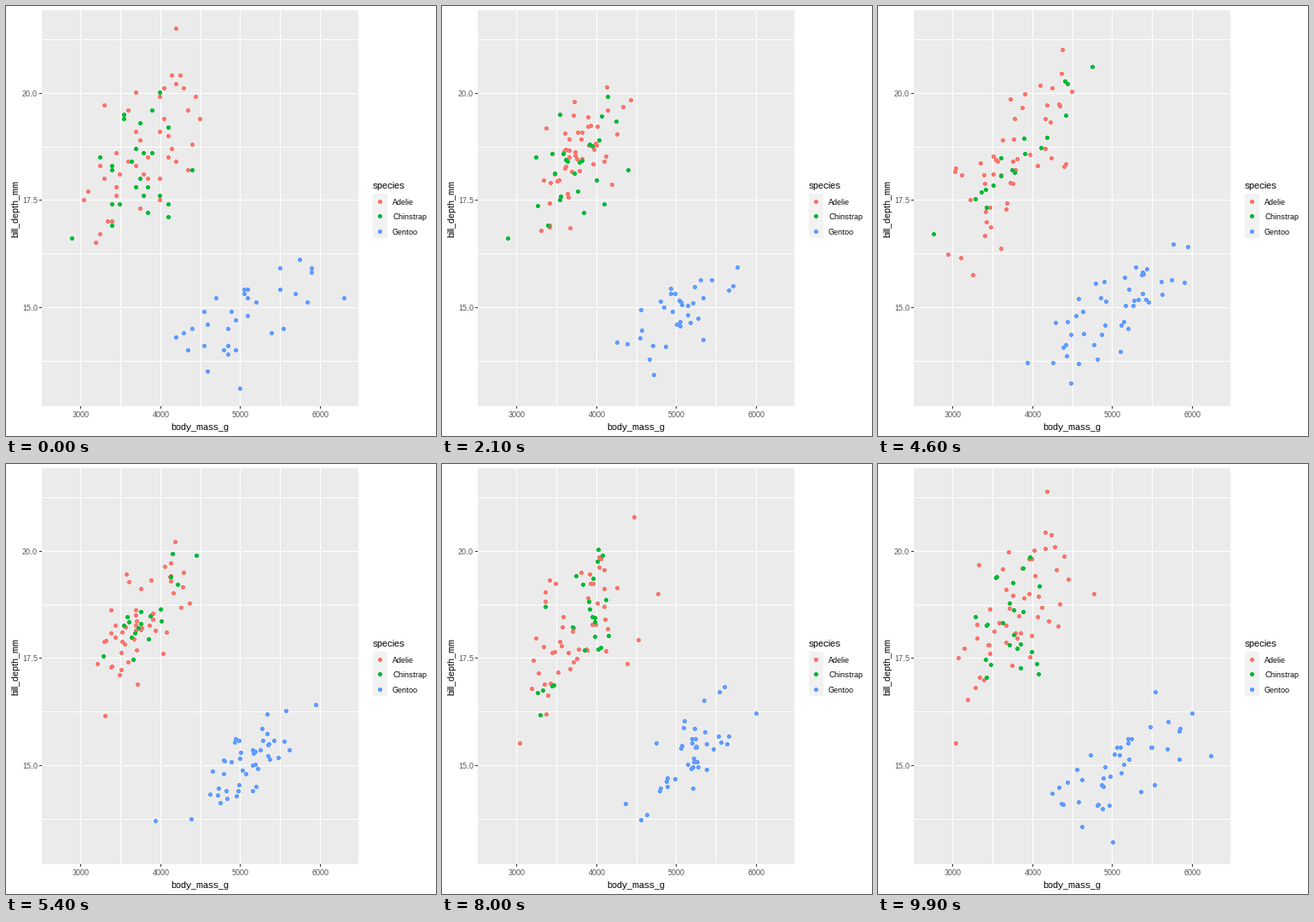
A matplotlib script that plays this animation: 504 px wide and 504 px high, repeating every 10 s.

```python
import numpy as np
import matplotlib.pyplot as plt
from matplotlib.animation import FuncAnimation
from matplotlib.collections import PolyCollection
from matplotlib.patches import Rectangle

SIZE = 504
LEFT, RIGHT, TOP, BOTTOM = 42, 413, 5, 469
MASS_MIN, MASS_MAX = 2520, 6480
DEPTH_MIN, DEPTH_MAX = 12.68, 21.92
COLORS = {"Adelie": "#F8766D", "Chinstrap": "#00BA38", "Gentoo": "#619CFF"}
DIAMOND = 2.5 * np.array([(1, 0), (0, 1), (-1, 0), (0, -1)])

# Per species, one row for each year: count, mass span, trend depth at
# both ends of the span, spread about the trend, two outlying points.
SHAPES = {
    "Adelie": (
        (47, (2900, 4700), (17.4, 20.1), 1.9, [(3250, 16.7), (4200, 21.5)]),
        (48, (2850, 4700), (16.7, 19.8), 1.9, [(2900, 16.1), (4400, 21.1)]),
        (50, (2900, 4700), (16.8, 19.6), 2.0, [(3050, 15.5), (4775, 19.0)]),
    ),
    "Chinstrap": (
        (24, (3200, 4200), (17.9, 19.0), 1.9, [(2900, 16.6), (4400, 18.2)]),
        (16, (3200, 4550), (16.9, 20.0), 1.1, [(2700, 16.6), (4800, 20.7)]),
        (22, (3200, 4300), (17.2, 19.4), 1.7, [(3250, 16.6), (4050, 19.9)]),
    ),
    "Gentoo": (
        (32, (4050, 6100), (13.5, 16.0), 1.3, [(5000, 13.1), (6300, 15.2)]),
        (44, (4100, 6000), (13.6, 16.2), 1.2, [(3950, 13.7), (5950, 16.4)]),
        (41, (4450, 5950), (13.9, 16.6), 1.2, [(4375, 14.1), (6000, 16.2)]),
    ),
}

# start frame and length of each move to the next year
MOVES = ((11, 22), (45, 22), (79, 21))

plt.rcParams.update({
    "font.family": "Liberation Sans",
    "text.hinting": "native",
    "text.hinting_factor": 1,
})


def px(mass):
    return LEFT + (mass - MASS_MIN) / (MASS_MAX - MASS_MIN) * (RIGHT - LEFT)


def py(depth):
    return TOP + 0.5 + (DEPTH_MAX - depth) / (DEPTH_MAX - DEPTH_MIN) * (BOTTOM - TOP)


def scatter_year(rng, count, span, trend, spread, outliers):
    """Points thickest mid-span, scattered about a rising line."""
    u, v = rng.beta(2, 2, (2, count))
    mass = span[0] + u * (span[1] - span[0])
    depth = trend[0] + u * (trend[1] - trend[0]) + spread * (2 * v - 1)
    cloud = np.column_stack([np.round(mass / 50) * 50, np.round(depth, 1)])
    return np.vstack([cloud, outliers])


rng = np.random.default_rng(7)
YEARS = {name: [scatter_year(rng, *row) for row in rows]
         for name, rows in SHAPES.items()}

fig = plt.figure(figsize=(SIZE / 72, SIZE / 72), dpi=72, facecolor="white")
ax = fig.add_axes([0, 0, 1, 1])
ax.set_xlim(0, SIZE)
ax.set_ylim(SIZE, 0)
ax.axis("off")


def box(x, y, w, h, color):
    ax.add_patch(Rectangle((x, y), w, h, fc=color, lw=0, zorder=0))


def label(x, y, s, size, color="black", ha="left", **kw):
    ax.text(x, y, s, fontsize=size, color=color, ha=ha, va="baseline", **kw)


def diamonds(x, y):
    centres = np.floor(np.column_stack([x, y])) + 0.5
    return centres[:, None, :] + DIAMOND


def dots(verts, color):
    art = PolyCollection(verts, facecolors=color, linewidths=0,
                         antialiaseds=False, zorder=3)
    art.set_snap(False)
    return ax.add_collection(art, autolim=False)


def draw_axes():
    box(LEFT, TOP, RIGHT - LEFT, BOTTOM - TOP, "#EBEBEB")
    for mass in range(3000, 6001, 500):
        x = round(px(mass))
        box(x, TOP, 1, BOTTOM - TOP, "white")
        if mass % 1000 == 0:
            box(x, BOTTOM, 1, 3, "#333333")
            label(x + 0.5, 482.5, str(mass), 9, "#4D4D4D", "center")
    for i in range(7):
        depth = 13.75 + 1.25 * i
        y = round(py(depth))
        box(LEFT, y, RIGHT - LEFT, 1, "white")
        if i % 2:
            box(LEFT - 3, y, 3, 1, "#333333")
            label(37, y + 4, f"{depth:.1f}", 9, "#4D4D4D", "right")
    label(227.5, 497, "body_mass_g", 11, ha="center")
    label(14.5, 237.5, "bill_depth_mm", 11, ha="center",
          rotation=90, rotation_mode="anchor")


def draw_legend():
    label(430, 214, "species", 11)
    box(430, 220, 17, 52, "#F2F2F2")
    for i, (name, color) in enumerate(COLORS.items()):
        y = int(229.5 + 17.28 * i)
        dots(diamonds([438], [y]), color)
        label(453, y + 4, name, 9)


def blend(a, b, t):
    """Move paired rows; rows without a partner stay until the move ends."""
    if t >= 1:
        return b
    n = min(len(a), len(b))
    return np.vstack([a[:n] + (b[:n] - a[:n]) * t, a[n:]])


def stage(frame):
    """Year left, year approached and how far along the move is."""
    here = max(sum(frame >= start for start, _ in MOVES) - 1, 0)
    start, steps = MOVES[here]
    return here, (here + 1) % 3, np.clip((frame - start) / steps, 0, 1)


draw_axes()
draw_legend()
clouds = {name: dots([], color) for name, color in COLORS.items()}


def update(frame):
    here, there, t = stage(frame)
    for name, years in YEARS.items():
        mass, depth = blend(years[here], years[there], t).T
        clouds[name].set_verts(diamonds(px(mass), py(depth)))
    return list(clouds.values())


anim = FuncAnimation(fig, update, frames=100, interval=100,
                     repeat=True, repeat_delay=0, blit=False)
plt.show()
```
